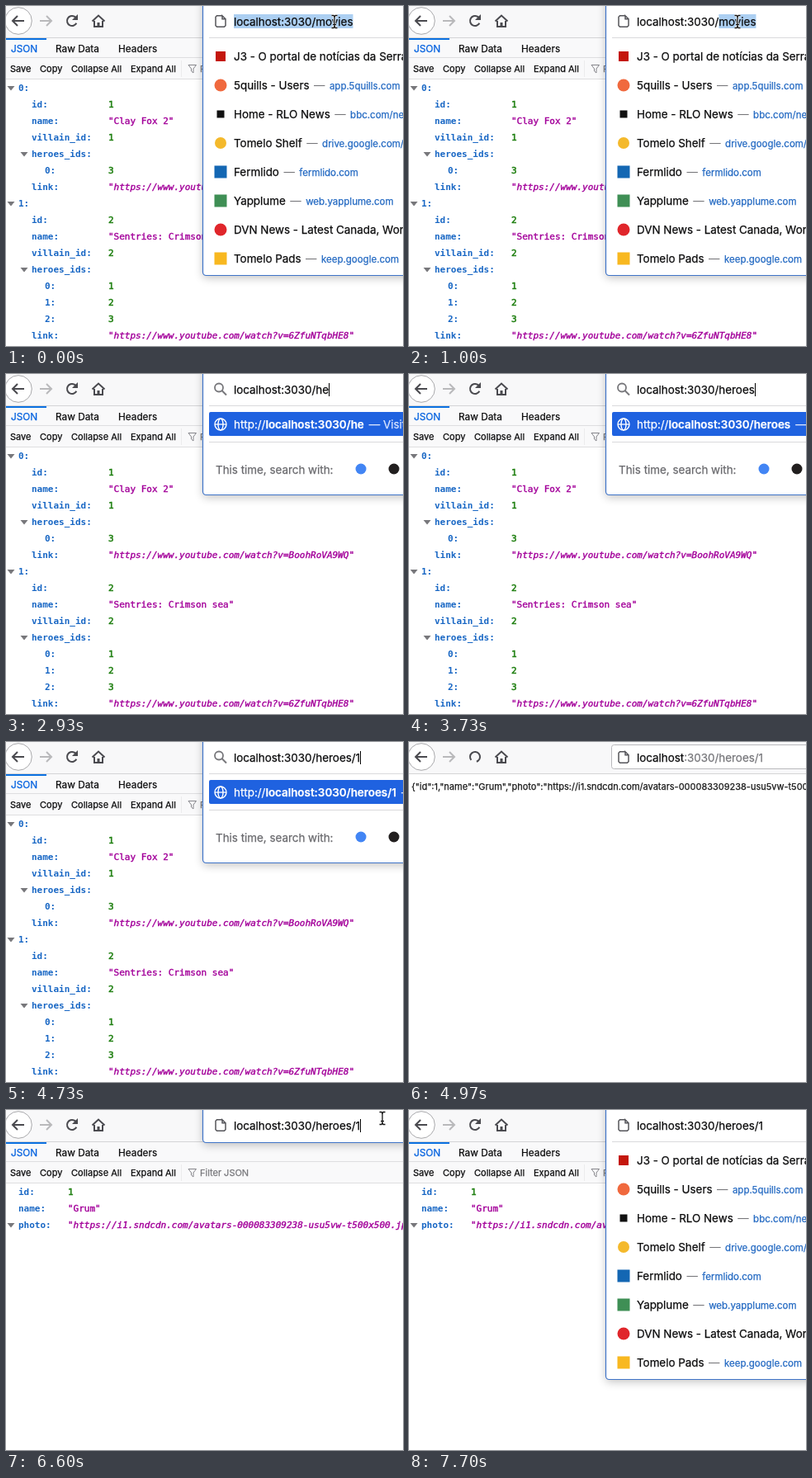
An HTML page with a canvas that plays this animation: 481x412 px, repeating every 8000 ms.

```html
<!DOCTYPE html>
<html lang="en">
<head>
<meta charset="utf-8">
<title>JSON browser</title>
<style>
html, body { margin: 0; width: 100%; height: 100%; overflow: hidden; background: #fff; }
canvas { display: block; width: 481px; height: 412px; }
</style>
</head>
<body>
<canvas id="stage" width="481" height="412"></canvas>
<script>
const ctx = document.getElementById('stage').getContext('2d');
const W = 481, H = 412, LOOP = 8000;
const UI = 'Inter, "Open Sans", sans-serif';
const MONO = '"DejaVu Sans Mono", "Liberation Mono", monospace';
const BLUE = '#1766c4', GREEN = '#1b7d0c', PINK = '#a3009a', INK = '#0c0c0d', ICON = '#4a4a4f';
const URL_X = 276, URL_SIZE = 13.4, HOST = 'localhost:3030/';

// time of each key press and the text after the host
const KEYS = [[2700, 'h'], [2880, 'he'], [3060, 'her'], [3240, 'hero'], [3400, 'heroe'],
  [3560, 'heroes'], [4050, 'heroes/'], [4420, 'heroes/1']];
const LOADING = 4880, LOADED = 5000, JSON_READY = 5070, FOCUS = 6500, OPEN = 6680;

const MOVIES = [
  [0, '0', null, 1], [1, 'id', 1], [1, 'name', 'Clay Fox 2'], [1, 'villain_id', 1],
  [1, 'heroes_ids', null, 1], [2, '0', 3],
  [1, 'link', 'https://www.youtube.com/watch?v=BoohRoVA9WQ'],
  [0, '1', null, 1], [1, 'id', 2], [1, 'name', 'Sentries: Crimson sea'], [1, 'villain_id', 2],
  [1, 'heroes_ids', null, 1], [2, '0', 1], [2, '1', 2], [2, '2', 3],
  [1, 'link', 'https://www.youtube.com/watch?v=6ZfuNTqbHE8']
];
const PHOTO = 'https://i1.sndcdn.com/avatars-000083309238-usu5vw-t500x500.jpg';
const HERO = [[0, 'id', 1], [0, 'name', 'Grum'], [0, 'photo', PHOTO, 1]];
const RAW = `{"id":1,"name":"Grum","photo":"${PHOTO}"}`;

// title, address, icon colour, icon size, round icon
const SITES = [
  ['J3 - O portal de notícias da Serra', '', '#c4170c', 12],
  ['5quills - Users', 'app.5quills.com', '#f0693e', 15, 1],
  ['Home - RLO News', 'bbc.com/news', '#111', 9],
  ['Tomelo Shelf', 'drive.google.com/drive', '#f4b92c', 14, 1],
  ['Fermlido', 'fermlido.com', '#1467b3', 15],
  ['Yapplume', 'web.yapplume.com', '#3f8f55', 15],
  ['DVN News - Latest Canada, World', '', '#e0262b', 15, 1],
  ['Tomelo Pads', 'keep.google.com', '#f8b820', 15]
];

const uiFont = (size, weight = 400) => `${weight} ${size}px ${UI}`;

// a hairline outline gives the slightly heavy look of smoothed text
function text(s, x, y, font, color, outline = 0.25) {
  ctx.font = font;
  ctx.fillStyle = ctx.strokeStyle = color;
  ctx.lineWidth = outline;
  ctx.fillText(s, x, y);
  if (outline) ctx.strokeText(s, x, y);
  return x + ctx.measureText(s).width;
}

function rect(x, y, w, h, color) {
  ctx.fillStyle = color;
  ctx.fillRect(x, y, w, h);
}

function line(points, color, width = 2) {
  ctx.beginPath();
  points.forEach(([x, y], i) => i ? ctx.lineTo(x, y) : ctx.moveTo(x, y));
  ctx.strokeStyle = color;
  ctx.lineWidth = width;
  ctx.stroke();
}

function arc(x, y, r, color, width, from = 0, to = Math.PI * 2) {
  ctx.beginPath();
  ctx.arc(x, y, r, from, to);
  ctx.strokeStyle = color;
  ctx.lineWidth = width;
  ctx.stroke();
}

function fillShape(points, color) {
  ctx.beginPath();
  points.forEach(([x, y]) => ctx.lineTo(x, y));
  ctx.fillStyle = color;
  ctx.fill();
}

function mark(x, y, size, color, round) {
  if (!round) return rect(x - size / 2, y - size / 2, size, size, color);
  ctx.beginPath();
  ctx.arc(x, y, size / 2, 0, Math.PI * 2);
  ctx.fillStyle = color;
  ctx.fill();
}

function arrow(x, dir, color) {
  line([[x - 7 * dir, 18], [x + 7 * dir, 18]], color);
  line([[x + dir, 12], [x + 7 * dir, 18], [x + dir, 24]], color);
}

function navBar(loading) {
  rect(0, 0, W, 38, '#f8f8f9');
  rect(0, 38, W, 1, '#d4d4d6');
  mark(15, 18, 32, '#fff', 1);
  arc(15, 18, 16.3, '#a9a9ac', 1);
  arrow(15, -1, ICON);
  arrow(48, 1, '#b9b9bb');
  if (loading) {
    arc(80, 18, 6, ICON, 2, -Math.PI * 1.22, Math.PI * 0.4);
  } else {
    arc(80, 18, 6, ICON, 2, Math.PI * 0.15, Math.PI * 1.75);
    fillShape([[87, 10], [87, 17], [80, 17]], ICON);
  }
  line([[104.5, 18.5], [112, 11.5], [119.5, 18.5]], ICON);
  line([[107, 18], [107, 25], [117, 25], [117, 18]], ICON);
  rect(110.5, 20, 3, 5, ICON);
}

function viewerBar() {
  rect(0, 39, W, 50, '#f9f9fa');
  rect(0, 62, W, 1, '#dedee0');
  rect(0, 88, W, 1, '#dedee0');
  rect(0, 39, 49, 2, '#0a70e0');
  const tab = uiFont(11.8), tool = uiFont(11);
  text('JSON', 6, 56, tab, '#0060df');
  text('Raw Data', 60, 56, tab, INK);
  text('Headers', 136, 56, tab, INK);
  text('Save', 5, 80, tool, INK);
  text('Copy', 41, 80, tool, INK);
  text('Collapse All', 79, 80, tool, INK);
  text('Expand All', 151, 80, tool, INK);
  rect(212, 66, 1, 20, '#ebebed');
  line([[221, 71.5], [230.5, 71.5], [227, 76], [227, 81], [224.5, 79], [224.5, 76], [221, 71.5]], '#85858a', 1);
  text('Filter JSON', 235, 80, tool, '#77777b');
}

function tree(rows, valueX) {
  const plain = `11px ${MONO}`;
  rows.forEach(([level, key, value, open], i) => {
    const y = 99 + i * 20, x = 15 + level * 16;
    if (open) fillShape([[x - 13.5, y - 2], [x - 4.5, y - 2], [x - 9, y + 3.5]], '#77777b');
    text(key + ':', x, y + 4, 'bold ' + plain, BLUE, 0);
    if (typeof value === 'number') text(value, valueX, y + 4, plain, GREEN, 0.5);
    if (typeof value !== 'string') return;
    const style = value.startsWith('http') ? 'italic ' : '';
    let end = text('"', valueX, y + 4, plain, PINK, 0.4);
    end = text(value, end, y + 4, style + plain, PINK, 0.4);
    text('"', end, y + 4, plain, PINK, 0.4);
  });
}

function panel(bottom) {
  ctx.save();
  ctx.shadowColor = 'rgba(0,0,0,.24)';
  ctx.shadowBlur = 11;
  ctx.shadowOffsetY = 3;
  ctx.beginPath();
  ctx.roundRect(238.5, -10, 260, bottom + 10, 4);
  ctx.fillStyle = '#fff';
  ctx.fill();
  ctx.restore();
  ctx.strokeStyle = '#3f74c8';
  ctx.lineWidth = 1.2;
  ctx.stroke();
}

function pageIcon() {
  line([[262, 11.8], [255.5, 11.8], [254, 13.3], [254, 23.7], [255.5, 25.2], [264.5, 25.2],
    [266, 23.7], [266, 15.8], [262, 11.8], [262, 15.8], [266, 15.8]], '#55555a', 1.5);
}

function siteList() {
  rect(246, 38, W, 1, '#d9d9dc');
  SITES.forEach(([title, address, color, size, round], i) => {
    const y = 61 + i * 35;
    mark(260, y, size, color, round);
    const end = text(title, URL_X, y + 5, uiFont(URL_SIZE), INK);
    if (!address) return;
    const dash = text('—', end + 5.5, y + 5, uiFont(URL_SIZE), '#77777b', 0);
    text(address, dash + 5.5, y + 5, uiFont(11.5), '#2369c2');
  });
}

function searchList(path) {
  rect(246, 38, W, 1, '#d9d9dc');
  ctx.beginPath();
  ctx.roundRect(246, 46, 250, 29, 2);
  ctx.fillStyle = '#1f62e0';
  ctx.fill();
  arc(260, 61, 7, '#fff', 1.4);
  ctx.beginPath();
  ctx.ellipse(260, 61, 3, 7, 0, 0, Math.PI * 2);
  ctx.stroke();
  line([[253, 61], [267, 61]], '#fff', 1.3);
  let x = text('http://', URL_X, 66, uiFont(URL_SIZE), '#fff');
  x = text(HOST + path, x, 66, uiFont(URL_SIZE, 600), '#fff');
  text('— Visit', x + 6, 66, uiFont(URL_SIZE), '#dbe6ff');
  rect(246, 82, W, 1, '#d9d9dc');
  text('This time, search with:', 254, 121, uiFont(URL_SIZE), '#6a6a6e');
  mark(430, 115, 13, '#4285f4', 1);
  mark(470, 115, 13, '#221f1f', 1);
}

function urlWidth(s) {
  ctx.font = uiFont(URL_SIZE);
  return ctx.measureText(s).width;
}

// selectFrom: index of the first selected letter, or -1
function urlText(s, selectFrom, caretX) {
  if (selectFrom >= 0) {
    const start = urlWidth(s.slice(0, selectFrom));
    rect(URL_X + start, 10, urlWidth(s) - start, 17, '#accff2');
  }
  text(s, URL_X, 24, uiFont(URL_SIZE), INK);
  if (caretX) rect(Math.round(caretX), 11, 1, 16, '#000');
}

function iBeam(x, y) {
  for (const [color, width] of [['#fff', 3], ['#111', 1.3]]) {
    line([[x - 3.5, y - 7.5], [x - 1, y - 7.5], [x, y - 6], [x + 1, y - 7.5], [x + 3.5, y - 7.5]], color, width);
    line([[x - 3.5, y + 7.5], [x - 1, y + 7.5], [x, y + 6], [x + 1, y + 7.5], [x + 3.5, y + 7.5]], color, width);
    line([[x, y - 6], [x, y + 6]], color, width);
    line([[x - 2, y + 3.5], [x + 2, y + 3.5]], color, width);
  }
}

function ease(t, from, to) {
  const k = Math.min(1, Math.max(0, (t - from) / (to - from)));
  return k * k * (3 - 2 * k);
}

function moviesScene(t) {
  navBar(false);
  viewerBar();
  tree(MOVIES, 124);
  const key = KEYS.filter(k => k[0] <= t).pop();
  if (key) {
    panel(146.5);
    arc(258, 16.5, 5, '#77777b', 1.8);
    line([[261.5, 20], [267, 25.5]], '#77777b', 2);
    searchList(key[1]);
    const s = HOST + key[1];
    const shown = (t - key[0]) % 1000 < 500;
    urlText(s, -1, shown && URL_X + urlWidth(s));
    return;
  }
  panel(326.5);
  pageIcon();
  siteList();
  const select = t < 870 ? 0 : t < 930 ? -1 : HOST.length;
  urlText(HOST + 'movies', select, select < 0 && 398);
  iBeam(398 + 4.5 * ease(t, 1750, 2250), 19);
}

function heroScene(t) {
  navBar(t < LOADED);
  if (t < JSON_READY) {
    text(RAW, 3, 58, uiFont(11), '#1a1a1a');
  } else {
    viewerBar();
    tree(HERO, 75);
  }
  const s = HOST + 'heroes/1';
  if (t < FOCUS) {
    ctx.beginPath();
    ctx.roundRect(245.5, 3.5, 260, 29, 3);
    ctx.fillStyle = '#fff';
    ctx.fill();
    ctx.strokeStyle = '#b9b9bc';
    ctx.lineWidth = 1;
    ctx.stroke();
    pageIcon();
    const x = text('localhost', URL_X, 24, uiFont(URL_SIZE), INK);
    text(s.slice(9), x, 24, uiFont(URL_SIZE), '#77777b');
  } else {
    const open = t >= OPEN;
    panel(open ? 326.5 : 39.5);
    pageIcon();
    if (open) siteList();
    const selected = open && t < 7610;
    const caret = !open || (t >= 7610 && t < 7700);
    urlText(s, selected ? 0 : -1, caret && URL_X + urlWidth(s));
  }
  if (t >= 5930 && t < 7610) {
    const k = ease(t, 5930, 6330);
    iBeam(488 - 32 * k, 28 - 18 * k);
  }
}

function draw(t) {
  rect(0, 0, W, H, '#fff');
  if (t < LOADING) moviesScene(t);
  else heroScene(t);
}

const start = performance.now();
function tick() {
  draw((performance.now() - start) % LOOP);
  requestAnimationFrame(tick);
}
tick();
</script>
</body>
</html>
```
